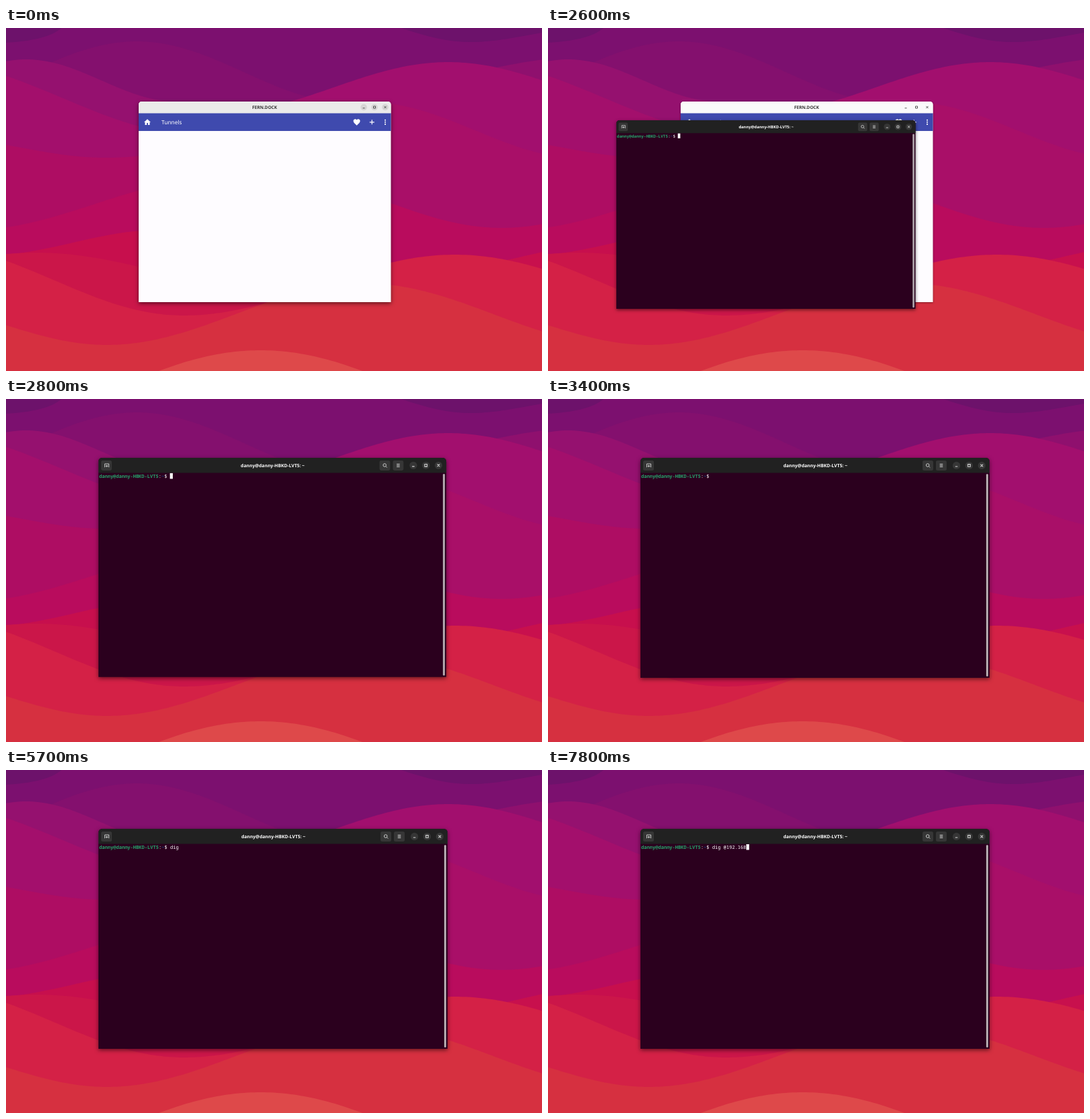
An HTML page for the animation above (8 s loop, 800x513 px).

```html
<!DOCTYPE html>
<html lang="en">
<head>
<meta charset="utf-8">
<title>Desktop with terminal</title>
<style>
  html, body { margin: 0; width: 100%; height: 100%; overflow: hidden; background: #7c106f; }
  svg { display: block; width: 800px; height: 513px; }
  text { white-space: pre; text-rendering: geometricPrecision; }
  .title { font: bold 6.5px "Open Sans", sans-serif; text-anchor: middle; }
  .bar { font: 8.35px "Noto Sans", sans-serif; fill: #fff; }
  .mono { font: 7.07px "Noto Sans Mono", monospace; fill: #fff; }
  .bold { font-weight: bold; }
  .line { fill: none; stroke: var(--ink); stroke-width: .9; }
  .dots { fill: var(--dot); }
  .window { filter: drop-shadow(0 2px 3px rgba(0, 0, 0, .55)); }
  #app { --ink: #444; --dot: #d7d6d5; --head: #ebebea; }
  #app.inactive { --dot: none; --head: #fafafa; filter: drop-shadow(0 1px 1.5px rgba(0, 0, 0, .4)); }
  #term { --ink: #d8d8d8; --dot: #363636; }
</style>
</head>
<body>
<svg viewBox="0 0 800 513">
  <defs>
    <g id="controls">
      <g class="dots"><circle cx="-16" r="4.8"/><circle r="4.8"/><circle cx="16" r="4.8"/></g>
      <path class="line" d="M-17.500 1.300h3M-1.500-1.500h3v3h-3ZM14.400-1.600l3.200 3.200m0-3.200l-3.200 3.200"/>
    </g>
    <rect id="button" class="dots" width="16" height="15" rx="2.500"/>
  </defs>

  <rect width="800" height="513" fill="#7c106f"/>
  <path d="M0 0H83C68 13 38 20 0 22Z M590 0C630 14 665 22 700 21S765 13 800 7V0Z" fill="#6d126b"/>
  <g id="waves"></g>

  <g id="app" class="window">
    <path d="M198 410V115q0-5 5-5H569.500q5 0 5 5V410Z" fill="#fefcff"/>
    <path d="M198 127.500V115q0-5 5-5H569.500q5 0 5 5V127.500Z" fill="var(--head)"/>
    <text class="title" x="386" y="121.300" fill="#333">FERN.DOCK</text>
    <use href="#controls" x="550" y="118.500"/>
    <rect x="198" y="127.500" width="376.500" height="26.500" fill="#3f4aae"/>
    <text class="bar" x="232" y="144">Tunnels</text>
    <g fill="#fff">
      <path d="M211 136.300l5 4.600h-1.500v4.200h-2.600v-3h-1.800v3h-2.600v-4.200H206Z"/>
      <path d="M523.500 145.700C520 142.600 518.500 141.200 518.500 139.100C518.500 136.400 521.900 135.300 523.500 137.600C525.100 135.300 528.500 136.400 528.500 139.100C528.500 141.200 527 142.600 523.500 145.700Z"/>
      <path d="M546.200 137.300v7M542.700 140.800h7" stroke="#fff" stroke-width="1.200"/>
      <path d="M566 137.700v6.300" stroke="#fff" stroke-width="2.100" stroke-linecap="round" stroke-dasharray="0 3.100"/>
    </g>
  </g>

  <g id="term" class="window">
    <path d="M0 329V6q0-6 6-6H515q6 0 6 6V329Z" fill="#2b001e"/>
    <path d="M0 22.500V6q0-6 6-6H515q6 0 6 6V22.500Z" fill="#212121"/>
    <use href="#button" x="4" y="4"/>
    <use href="#button" x="421" y="4"/>
    <use href="#button" x="441" y="4"/>
    <use href="#controls" transform="translate(490.500 11.400) scale(1.180)"/>
    <path class="line" d="M9.500 14.200V9h6v5.200M12.500 10.500v3.600M10.700 12.300h3.600M430.500 12.800l1.800 1.800M446.700 9.400h4.600m-4.600 2h4.600m-4.600 2h4.600"/>
    <circle class="line" cx="428.700" cy="11" r="2.300"/>
    <text class="title" style="font-size:6.800px" x="261" y="13.800" fill="#fff">danny@danny-HBKD-LVT5: ~</text>
    <text class="mono" x="1" y="30"><tspan class="bold" fill="#26a269">danny@danny-HBKD-LVT5</tspan>:<tspan class="bold" fill="#12488b">~</tspan>$ <tspan id="typed"></tspan></text>
    <rect id="cursor" y="23" width="4.300" height="8.500" fill="#fff"/>
    <rect x="516" y="24" width="3" height="303" rx="1.500" fill="#b2a9ae"/>
  </g>
</svg>
<script>
const $ = id => document.getElementById(id);

// One cosine swell, filled to the floor: crest (x, y), falling by `drop` at `reach` to either side.
// A negative drop makes a valley.
function wave(color, x, y, reach, drop) {
  const points = [];
  for (let dx = -reach; dx <= reach; dx += 5)
    points.push([x + dx, y + drop * Math.sin(Math.PI / 2 * dx / reach) ** 2]);
  const path = document.createElementNS("http://www.w3.org/2000/svg", "path");
  path.setAttribute("d", `M${points.join("L")}V513H${x - reach}Z`);
  path.setAttribute("fill", color);
  $("waves").append(path);
}

wave("#84106e", 195, 20, 320, 92);
wave("#95116f", 30, 47, 225, 63);
wave("#8f106e", 840, 45, 200, 25);
wave("#a20f6e", 660, 51, 340, 75);
wave("#a30f6c", -120, 50, 410, 110);
wave("#a90f68", 540, 111, 320, 84);
wave("#ae0d63", 150, 194, 260, -31);
wave("#b90c5d", -60, 303, 390, -81);
wave("#b90c5d", 740, 299, 350, -81);
wave("#c70f4d", 230, 302, 260, 38);
wave("#c8104d", 850, 330, 160, 24);
wave("#cb1649", 45, 336, 375, 59);
wave("#d42146", -120, 325, 385, 105);
wave("#d42146", 670, 339, 405, 91);
wave("#d63040", -150, 415, 300, 59);
wave("#d63040", 535, 382, 385, 92);
wave("#de494a", 380, 482, 500, 147);

const LOOP = 8000, OPEN = 2600, BLINK = 580;
const ADVANCE = 7.07 * .6, PROMPT = 25;

// Bursts of typing: text, time of its first key, time between keys.
const bursts = [["dig", 4700, 200], [" @", 5800, 400], ["192.1", 6700, 150], ["68", 7600, 0]];
const keys = bursts.flatMap(([text, start, gap]) =>
  [...text].map((char, i) => ({ char, time: start + i * gap })));

function draw(t) {
  const open = t >= OPEN;
  $("app").classList.toggle("inactive", open);
  $("term").style.display = open ? "" : "none";
  if (!open) return;

  // The window appears shifted, then settles into place in 100 ms steps.
  const step = Math.floor((t - OPEN) / 100);
  const scale = 1 - .143 * .16 ** step;
  const corner = step ? "138 88" : "102 138";
  $("term").setAttribute("transform", `translate(${corner}) scale(${scale})`);

  const typed = keys.filter(key => t >= key.time);
  $("typed").textContent = typed.map(key => key.char).join("");

  // Each key restarts the blinking.
  const since = typed.length ? typed.at(-1).time : OPEN - 40;
  const lit = Math.floor((t - since) / BLINK) % 2 === 0;
  $("cursor").setAttribute("x", 1 + ADVANCE * (PROMPT + typed.length));
  $("cursor").style.display = lit ? "" : "none";
}

const start = performance.now();
function frame() {
  draw((performance.now() - start) % LOOP);
  requestAnimationFrame(frame);
}
frame();
</script>
</body>
</html>
```
